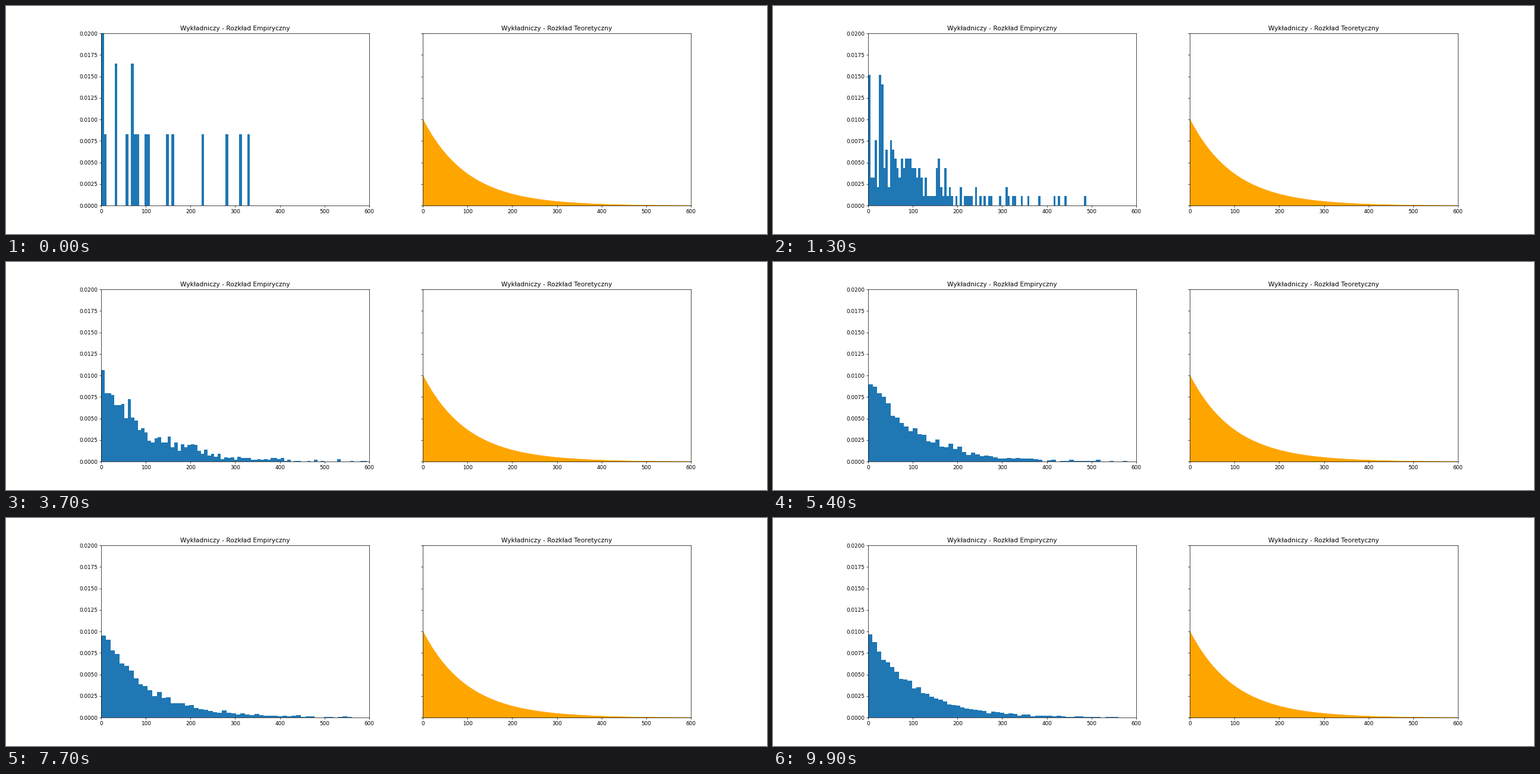
Recreate the animation shown at these times as a matplotlib script. Size 1280x384 px, loop 10 s.

```python
import numpy as np
import matplotlib.pyplot as plt
from matplotlib.animation import FuncAnimation

W, H, DPI = 1280, 384, 64
FRAMES, STEP = 100, 100
SCALE, BINS = 100, 100


def histogram(i):
    """Bin edges and densities of a fresh sample that grows with i squared."""
    rng = np.random.default_rng(i)
    sample = rng.exponential(SCALE, 20 + i * i)
    dens, edges = np.histogram(sample, BINS, density=True)
    return edges, dens


plt.rcParams["font.family"] = "DejaVu Sans"
fig, (left, right) = plt.subplots(1, 2, sharey=True, dpi=DPI,
                                  figsize=(W / DPI, H / DPI))
fig.subplots_adjust(left=0.125, right=0.9, bottom=0.125, top=0.88, wspace=0.2)

left.set_title("Wykładniczy - Rozkład Empiryczny")
right.set_title("Wykładniczy - Rozkład Teoretyczny")

x = np.linspace(0, 600, 601)
right.fill_between(x, np.exp(-x / SCALE) / SCALE, color="orange")
bars = left.bar(np.arange(BINS), np.zeros(BINS), align="edge", color="C0")

for ax in (left, right):
    ax.set_xlim(0, 600)
    ax.set_ylim(0, 0.02)


def draw(i):
    edges, dens = histogram(i)
    for bar, x0, x1, h in zip(bars, edges, edges[1:], dens):
        bar.set_bounds(x0, 0, x1 - x0, h)
    return list(bars)


anim = FuncAnimation(fig, draw, frames=FRAMES, interval=STEP,
                     init_func=lambda: draw(0), repeat=True, repeat_delay=0)
plt.show()
```
